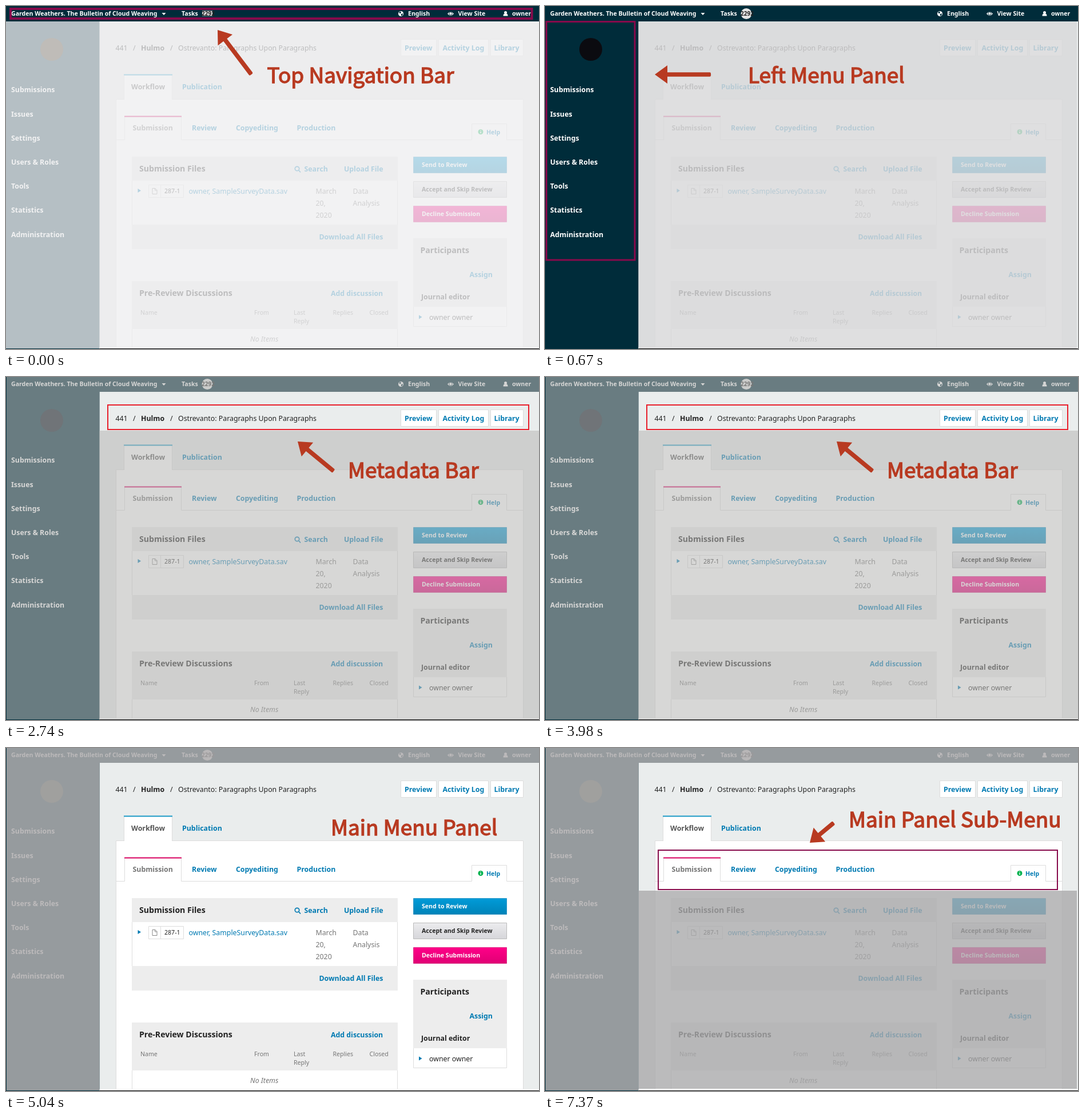
Recreate the animation shown at these times as an HTML page. Size 932 px wide and 601 px high, loop 8000 ms.

```html
<!DOCTYPE html>
<html lang="en">
<head>
<meta charset="utf-8">
<title>Editorial dashboard tour</title>
<style>
html, body { margin: 0; width: 100%; height: 100%; overflow: hidden; background: #eaeded; }
svg { display: block; width: 932px; height: 601px; }
text { font: 12.33px "Noto Sans", sans-serif; fill: #222; }
.b { font-weight: 700; }
.s { font-size: 10.57px; }
.h { font-size: 14.1px; font-weight: 700; }
.blue { fill: #007ab2; }
.gray { fill: #757575; }
.white, .white text { fill: #fff; }
.i { font-style: italic; }
.panel { fill: #fff; stroke: #ddd; }
.head { fill: #ededed; }
.callout { fill: #b83a21; }
.callout text {
  font: 36.95px "Noto Sans CJK JP", "Noto Sans CJK SC", sans-serif;
  fill: inherit; stroke: #b83a21; stroke-width: 1.4px;
}
.frame { fill: none; stroke: #870a4b; }
</style>
</head>
<body>
<svg viewBox="0 0 932 601">
  <defs>
    <linearGradient id="send" x2="0" y2="1"><stop stop-color="#009bd8"/><stop offset="1" stop-color="#0083b8"/></linearGradient>
    <linearGradient id="skip" x2="0" y2="1"><stop stop-color="#ececee"/><stop offset="1" stop-color="#d6d6da"/></linearGradient>
    <linearGradient id="decline" x2="0" y2="1"><stop stop-color="#ff0088"/><stop offset="1" stop-color="#e00074"/></linearGradient>
  </defs>

  <path fill="#eaeded" d="M0 0H932V601H0Z"/>

  <g id="ui">
    <path fill="#002c3a" d="M0 -1H932V26H163.500V601H0Z"/>

    <!-- Top bar -->
    <g class="white">
      <text class="s b" x="9" y="16">Garden Weathers. The Bulletin of Cloud Weaving</text>
      <path d="M272.500 11h7l-3.500 4z"/>
      <text class="s b" x="307" y="16">Tasks</text>
      <circle cx="690.500" cy="12.500" r="4.500"/>
      <path d="M687 10l3-1.500 1 2-2 2zM691 13l3-1-1 4-2 0z" fill="#002c3a"/>
      <text class="s b" x="703" y="16">English</text>
      <path d="M772 12.500q5.500-7 11 0q-5.500 7-11 0z"/>
      <circle cx="777.500" cy="12.300" r="2.700" fill="none" stroke="#002c3a"/>
      <text class="s b" x="790.500" y="16">View Site</text>
      <path d="M869.500 16.500q0-4 2.500-4h3q2.500 0 2.500 4z"/>
      <circle cx="873.500" cy="10.500" r="2.500"/>
      <text class="s b" x="885" y="16">owner</text>
    </g>
    <circle data-from="500" data-to="8000" cx="352" cy="12.500" r="9.500" fill="#e4e4e4"/>
    <path data-from="0" data-to="500" fill="#dcdcdc" d="M343 7.500h18v9h-18z"/>
    <text class="b" style="font-size:10px" x="342" y="16.300">2292</text>

    <!-- Left menu -->
    <g id="menu" class="white"></g>

    <!-- Metadata bar -->
    <text x="191.500" y="76.500">441</text>
    <text x="222" y="76.500">/</text>
    <text class="b" x="236" y="76.500">Hulmo</text>
    <text x="287" y="76.500">/</text>
    <text x="301" y="76.500">Ostrevanto: Paragraphs Upon Paragraphs</text>
    <path class="panel" d="M690.500 57.500h62v29h-62zM756.500 57.500h87v29h-87zM847.500 57.500h57v29h-57z"/>
    <text class="b blue" x="697" y="76.500">Preview</text>
    <text class="b blue" x="763.500" y="76.500">Activity Log</text>
    <text class="b blue" x="853.500" y="76.500">Library</text>

    <!-- Main tabs -->
    <path class="panel" d="M192.500 162.500h712V620h-712z"/>
    <path class="panel" d="M206.500 163V120H290.500V163"/>
    <path fill="#fff" d="M207 161h83v3h-83z"/>
    <path fill="#1e9dc9" d="M206 118.500h85v2h-85z"/>
    <text class="b" style="fill:#555" x="219" y="145">Workflow</text>
    <text class="b blue" x="308" y="145">Publication</text>

    <!-- Stage tabs -->
    <path fill="none" stroke="#ddd" d="M193 233.500H207.500V193M306.500 193V233.500H814.500V205.500H875.500V233.500H904"/>
    <path fill="#d8005f" d="M207 191.500h100v2h-100z"/>
    <text class="b gray" x="221.500" y="217">Submission</text>
    <text class="b blue" x="325" y="217">Review</text>
    <text class="b blue" x="402" y="217">Copyediting</text>
    <text class="b blue" x="508.500" y="217">Production</text>
    <circle cx="830" cy="219.500" r="4.500" fill="#00b24e"/>
    <path stroke="#fff" stroke-width="1.500" d="M830 216.500v1.300M830 219v3"/>
    <text class="s b blue" x="840" y="223.500">Help</text>

    <!-- Submission files -->
    <path class="panel" d="M220.500 263.500h464v161h-464z"/>
    <path class="head" d="M220 263h465v42h-465zM220 382h465v43h-465z"/>
    <text class="h" x="233" y="288.500">Submission Files</text>
    <g fill="none" stroke="#007ab2" stroke-width="1.700"><circle cx="509" cy="284" r="3.700"/><path d="M512 287l3 3.500"/></g>
    <text class="b blue" x="521.500" y="288.500">Search</text>
    <text class="b blue" x="591" y="288.500">Upload File</text>
    <path class="blue" d="M230.500 319v7l5.500-3.500z"/>
    <path class="panel" d="M249.500 312.500h61v22h-61zM270.500 313v21"/>
    <path fill="none" stroke="#888" d="M256 318.500h5l3 3v7h-8zM260.500 318.500v3.500h3.500"/>
    <text class="s" x="277" y="327">287-1</text>
    <text class="blue" x="319.500" y="327.500">owner, SampleSurveyData.sav</text>
    <text class="gray" x="541.500" y="327.500">March</text>
    <text class="gray" x="541.500" y="348.500">20,</text>
    <text class="gray" x="541.500" y="369.500">2020</text>
    <text class="gray" x="606.500" y="327.500">Data</text>
    <text class="gray" x="606.500" y="348.500">Analysis</text>
    <text class="b blue" x="547.500" y="408">Download All Files</text>

    <!-- Discussions -->
    <path class="panel" d="M220.500 481.500h464v140h-464z"/>
    <path class="head" d="M220 481h465v84h-465z"/>
    <text class="h" x="233" y="507">Pre-Review Discussions</text>
    <text class="b blue" x="568" y="506.500">Add discussion</text>
    <text class="s gray" x="235" y="540">Name</text>
    <text class="s gray" x="434" y="540">From</text>
    <text class="s gray" x="503" y="540">Last</text>
    <text class="s gray" x="503" y="554.500">Reply</text>
    <text class="s gray" x="571.500" y="540">Replies</text>
    <text class="s gray" x="635.500" y="540">Closed</text>
    <text class="gray i" x="427" y="587">No Items</text>

    <!-- Actions and participants -->
    <path fill="url(#send)" stroke="#007ab2" stroke-opacity=".6" d="M712.500 263.500h163v28h-163z"/>
    <path fill="url(#skip)" stroke="#bbb" d="M712.500 306.500h163v28h-163z"/>
    <path fill="url(#decline)" stroke="#c8006a" stroke-opacity=".6" d="M712.500 349.500h163v28h-163z"/>
    <text class="s b white" x="727" y="281">Send to Review</text>
    <text class="s b" x="727" y="324">Accept and Skip Review</text>
    <text class="s b white" x="727" y="367">Decline Submission</text>
    <path class="panel" d="M712.500 406.500h163v154h-163z"/>
    <path class="head" d="M712 406h164v120h-164z"/>
    <text class="h" x="724.500" y="432">Participants</text>
    <text class="b blue" x="810.500" y="474">Assign</text>
    <text class="b" x="726" y="513">Journal editor</text>
    <path class="blue" d="M722 540.500v7l5.500-3.500z"/>
    <text x="740" y="548.500">owner owner</text>
  </g>
  <path fill="#fff" d="M163.500 597.500H932V600H163.500Z"/>

  <!-- Dimming veils -->
  <path data-from="0" data-to="500" fill="#eeeef0" fill-opacity=".76" d="M0 27H932V600H0Z"/>
  <path data-from="500" data-to="2740" fill="#d9d9da" fill-opacity=".84" d="M163.500 27H930V600H163.500Z"/>
  <path data-from="2740" data-to="5040" fill="#b9b9b7" fill-opacity=".57" fill-rule="evenodd" d="M1 0H932V600H1ZM163.500 26H932V94H163.500Z"/>
  <path data-from="5040" data-to="8000" fill="#b1aeaf" fill-opacity=".85" d="M1 0H932V26H163.500V600H1Z"/>
  <path data-from="7370" data-to="8000" fill="#aaaaac" fill-opacity=".8" d="M163.500 250H930V597H163.500Z"/>

  <circle id="logo" cx="80" cy="76" r="20"/>
  <path d="M163.500 600H932V601H163.500Z"/>

  <!-- Highlights and captions -->
  <path class="frame" data-from="0" data-to="500" stroke-width="4" d="M8 5H919.500V22H8Z"/>
  <path class="frame" data-from="500" data-to="2740" stroke-width="3" d="M2.500 27.500H157V445H2.500Z"/>
  <path class="frame" data-from="2740" data-to="5040" stroke-width="2" style="stroke:#e8202c" d="M178 49H914V92H178Z"/>
  <path class="frame" data-from="7370" data-to="8000" stroke-width="2" d="M198 179H896V248H198Z"/>
  <g id="callouts"></g>
</svg>
<script>
const LOOP = 8000;
const byId = id => document.getElementById(id);

const menuItems = ["Submissions", "Issues", "Settings", "Users &amp; Roles", "Tools", "Statistics", "Administration"];
byId("menu").innerHTML = menuItems
  .map((label, i) => `<text class="b" x="9" y="${150.4 + 42.2 * i}">${label}</text>`).join("");

function arrow(tailX, tailY, tipX, tipY) {
  const length = Math.hypot(tipX - tailX, tipY - tailY);
  const angle = Math.atan2(tipY - tailY, tipX - tailX) * 180 / Math.PI;
  return `<path transform="translate(${tipX} ${tipY}) rotate(${angle})"
    d="M0 0L-22 16V3.800H${2 - length}q-2 0-2-2v-3.600q0-2 2-2H-22V-16Z"/>`;
}

const callouts = [
  { from: 0, to: 500, x: 456.5, y: 135, label: "Top Navigation Bar", arrow: [429, 120, 370, 42] },
  { from: 670, to: 2740, x: 355, y: 135, label: "Left Menu Panel", arrow: [290, 120, 192, 120] },
  { from: 2740, to: 4800, x: 598, y: 177, label: "Metadata Bar", arrow: [573, 165, 510, 113] },
  { from: 4800, to: 7370, x: 568, y: 153, label: "Main Menu Panel" },
  { from: 7370, to: 8000, x: 531, y: 139, label: "Main Panel Sub-Menu", arrow: [505, 131, 463, 166] },
];
byId("callouts").innerHTML = callouts.map(c =>
  `<g class="callout" data-from="${c.from}" data-to="${c.to}">${c.arrow ? arrow(...c.arrow) : ""}
    <text x="${c.x}" y="${c.y}">${c.label}</text></g>`).join("");

const timed = [...document.querySelectorAll("[data-from]")];
const logoColor = t => t < 500 ? "#bfbcb8" : t < 2740 ? "#0b0b10" : t < 5040 ? "#707478" : "#a0a09e";

function render(now) {
  const t = now % LOOP;
  for (const el of timed) {
    el.style.display = t >= el.dataset.from && t < el.dataset.to ? "" : "none";
  }
  byId("ui").setAttribute("transform", `translate(0 ${t < 2740 ? 1 : 0})`);
  byId("logo").setAttribute("fill", logoColor(t));
  requestAnimationFrame(render);
}
render(0);
</script>
</body>
</html>
```
